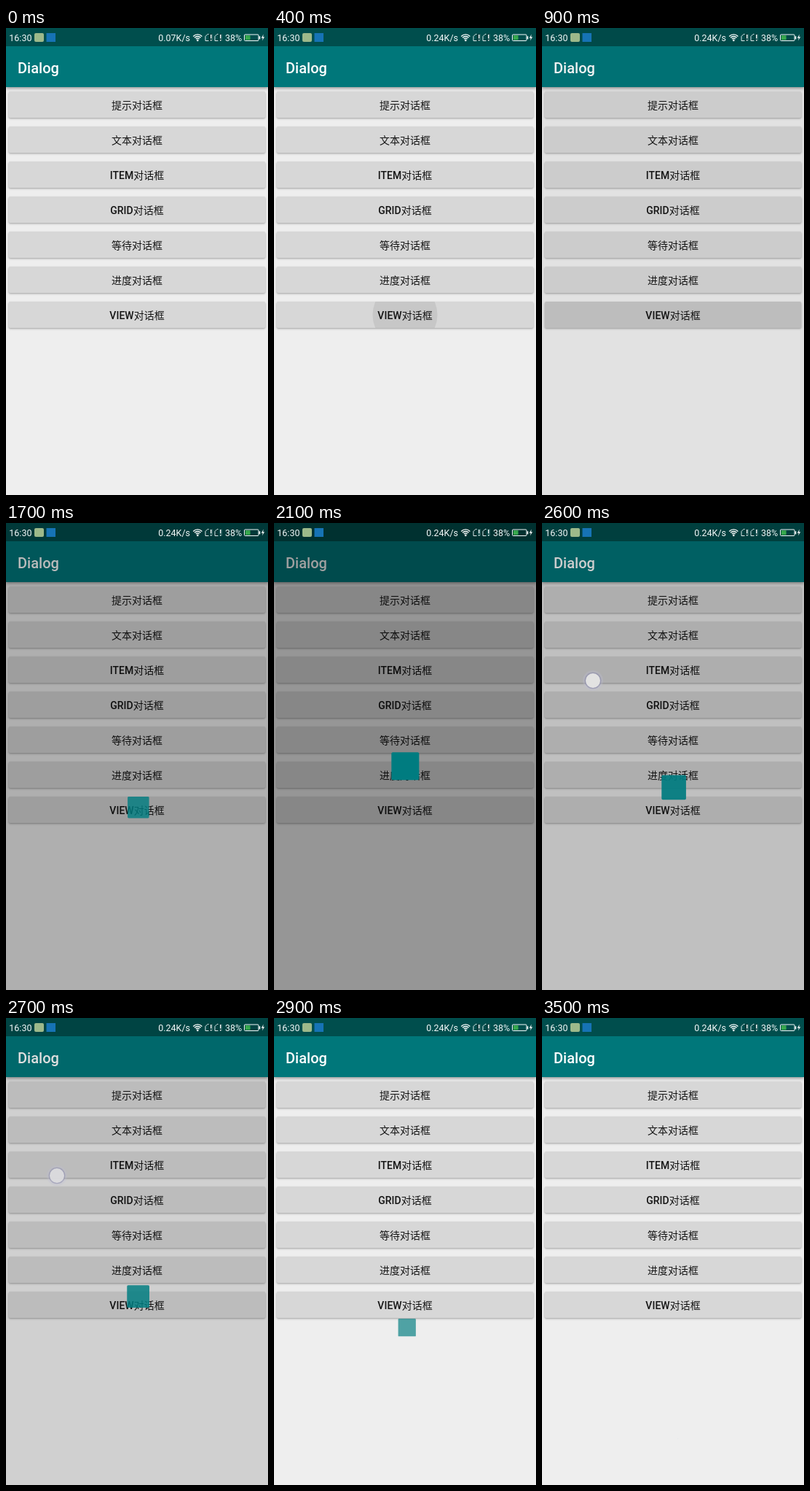
An HTML page with a canvas that plays this animation: 360 px wide and 640 px high, repeating every 3.9 s.

```html
<!DOCTYPE html>
<html lang="zh-CN">
<head>
<meta charset="utf-8">
<title>Dialog</title>
<style>
html, body { margin: 0; width: 100%; height: 100%; overflow: hidden; background: #eee; }
canvas { display: block; width: 360px; height: 640px; }
</style>
</head>
<body>
<canvas id="stage" width="360" height="640"></canvas>
<script>
const ctx = document.getElementById('stage').getContext('2d');
const LOOP = 3900, STEP = 100, LAST = 3500;
const FONT = 'Roboto, "Noto Sans CJK SC", "Noto Sans CJK", sans-serif';
const LABELS = ['提示对话框', '文本对话框', 'ITEM对话框', 'GRID对话框',
  '等待对话框', '进度对话框', 'VIEW对话框'];
const TAP = { x: 70, y: 216, from: 2200, fade: 2600, to: 2900 };

const clamp = v => Math.max(0, Math.min(1, v));
const span = (t, a, b) => clamp((t - a) / (b - a));

// linear interpolation through [time, value] points
function track(t, pts) {
  if (t <= pts[0][0]) return pts[0][1];
  for (let i = 1; i < pts.length; i++) {
    const [a, u] = pts[i - 1], [b, v] = pts[i];
    if (t <= b) return u + (v - u) * (t - a) / (b - a);
  }
  return pts[pts.length - 1][1];
}

function rect(x, y, w, h, color) {
  ctx.fillStyle = color;
  ctx.fillRect(x, y, w, h);
}

function round(x, y, w, h, r, color) {
  ctx.fillStyle = color;
  ctx.beginPath();
  ctx.roundRect(x, y, w, h, r);
  ctx.fill();
}

function circle(x, y, r, color) {
  ctx.fillStyle = color;
  ctx.beginPath();
  ctx.arc(x, y, r, 0, Math.PI * 2);
  ctx.fill();
}

function text(str, x, y, size, weight, color, align = 'left') {
  ctx.font = `${weight} ${size}px ${FONT}`;
  ctx.textAlign = align;
  ctx.fillStyle = color;
  ctx.fillText(str, x, y);
}

function shape(pts, color, stroke) {
  ctx.beginPath();
  pts.forEach(([x, y]) => ctx.lineTo(x, y));
  ctx.closePath();
  if (stroke) {
    ctx.strokeStyle = color;
    ctx.lineWidth = 1;
    ctx.stroke();
  } else {
    ctx.fillStyle = color;
    ctx.fill();
  }
}

function drawButton(label, y) {
  ctx.save();
  ctx.shadowColor = 'rgba(0,0,0,0.3)';
  ctx.shadowBlur = 2.5;
  ctx.shadowOffsetY = 1.3;
  round(3.7, y, 352.6, 36, 2, '#d7d7d7');
  ctx.restore();
  text(label, 180, y + 24, 14, 500, '#151515', 'center');
}

function drawRipple(t, y) {
  const grow = span(t, 300, 700);
  const alpha = 0.075 * (1 - span(t, 900, 1400));
  if (!grow || !alpha) return;
  ctx.save();
  ctx.beginPath();
  ctx.roundRect(4, y, 352, 36, 2);
  ctx.clip();
  circle(180, y + 18, 178 * grow, `rgba(0,0,0,${alpha})`);
  ctx.restore();
}

function drawPage(t) {
  rect(0, 0, 360, 640, '#eeeeee');
  ctx.save();
  ctx.shadowColor = 'rgba(0,0,0,0.35)';
  ctx.shadowBlur = 4;
  ctx.shadowOffsetY = 1.5;
  rect(0, 25, 360, 56, '#00777a');
  ctx.restore();
  rect(0, 0, 360, 25, '#004e4d');
  text('Dialog', 16, 61.5, 20, 500, '#fff');
  LABELS.forEach((label, i) => drawButton(label, 87 + 48 * i));
  drawRipple(t, 87 + 48 * 6);
}

function drawSim(x) {
  shape([[x + 3.5, 8.5], [x + 9.5, 8.5], [x + 9.5, 17.5], [x + 0.5, 17.5], [x + 0.5, 11.5]], '#dfe9e9', true);
  rect(x + 5, 8, 5, 10, '#003f3e');
  rect(x + 7.5, 9, 1.4, 5.5, '#fff');
  rect(x + 7.5, 16, 1.4, 1.6, '#fff');
}

function drawWifi(x, y) {
  ctx.strokeStyle = '#fff';
  ctx.lineWidth = 1.4;
  for (const r of [3.4, 6, 8.6]) {
    ctx.beginPath();
    ctx.arc(x, y, r, -Math.PI * 0.75, -Math.PI * 0.25);
    ctx.stroke();
  }
  circle(x, y - 0.6, 1.3, '#fff');
}

function drawStatus(t) {
  const ink = '#f4f8f8';
  text('16:30', 4.3, 17.5, 12.5, 400, ink);
  round(39, 7, 13, 12, 2, '#9db98a');
  rect(55.5, 7, 12.5, 12, '#1673b5');
  text(t < 400 ? '0.07K/s' : '0.24K/s', 253, 17.5, 12.5, 400, ink, 'right');
  drawWifi(263.3, 17.5);
  drawSim(273.5);
  drawSim(286.5);
  text('38%', 301, 17.5, 12.5, 400, ink);
  ctx.strokeStyle = ink;
  ctx.lineWidth = 1;
  ctx.beginPath();
  ctx.roundRect(327.5, 9, 19.5, 8.5, 1);
  ctx.stroke();
  rect(347.5, 11.3, 1.8, 4, ink);
  rect(328.8, 10.2, 6.8, 6.1, '#37a84d');
  shape([[353.8, 8.5], [350.8, 13.8], [352.9, 13.8], [351.9, 17.5], [355.2, 12.3], [353.1, 12.3]], ink);
}

function dimAt(t) {
  return t <= 2300
    ? 0.4 * span(t, 715, 2200)
    : 0.4 * (1 - span(t, 2300, 2880));
}

function scaleAt(t) {
  return t <= 2300
    ? track(t, [[900, 0], [1000, 0.055], [1200, 0.22], [1450, 0.49],
      [1700, 0.737], [1900, 0.87], [2100, 0.95], [2300, 1]])
    : 1 - Math.pow(span(t, 2300, 3530), 1.3);
}

function drawDialog(t) {
  const s = scaleAt(t);
  if (s <= 0) return;
  const size = 40 * s, x = 180 + 7 * (1 - s), y = 320 + 265 * (1 - s);
  ctx.globalAlpha = Math.min(1, s * 1.1);
  round(x - size / 2, y - size / 2, size, size, 2 * s, '#007c80');
  ctx.globalAlpha = 1;
}

function drawTap(t) {
  if (t < TAP.from || t >= TAP.to) return;
  ctx.globalAlpha = 1 - span(t, TAP.fade, TAP.to) * 0.4;
  circle(TAP.x, TAP.y, 14, 'rgba(190,190,215,0.28)');
  circle(TAP.x, TAP.y, 11.3, 'rgba(125,125,165,0.5)');
  circle(TAP.x, TAP.y, 10, '#e2e2e2');
  ctx.globalAlpha = 1;
}

function draw(t) {
  drawPage(t);
  rect(0, 0, 360, 640, `rgba(0,0,0,${dimAt(t)})`);
  drawDialog(t);
  drawStatus(t);
  drawTap(t);
}

let start;
function tick(now) {
  if (start === undefined) start = now;
  const t = (now - start) % LOOP;
  draw(Math.min(LAST, Math.floor(t / STEP) * STEP));
  requestAnimationFrame(tick);
}
draw(0);
requestAnimationFrame(tick);
</script>
</body>
</html>
```
